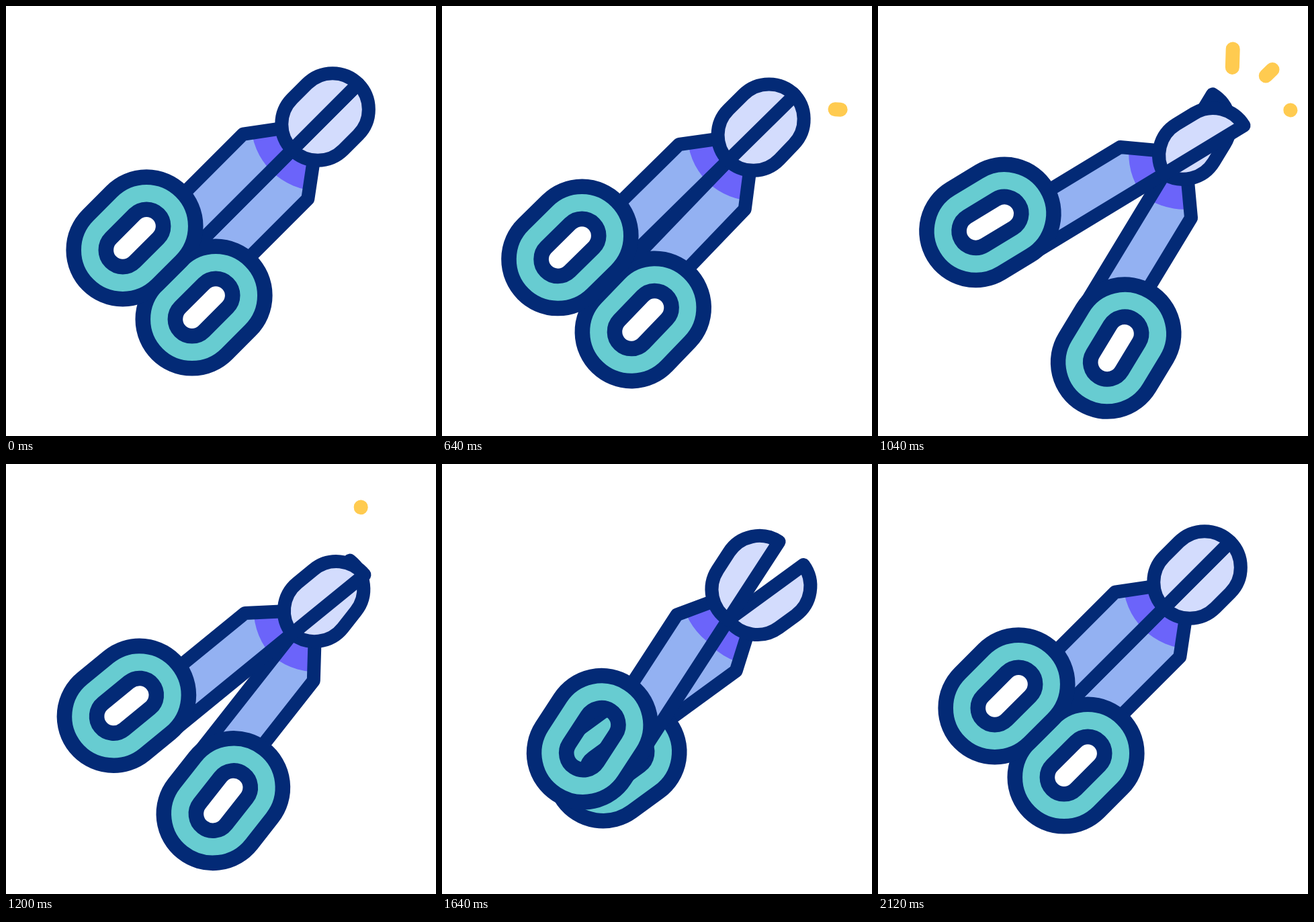
An HTML page with a canvas for the animation above (2440 ms loop, 640 by 640 pixels).

```html
<!DOCTYPE html>
<html lang="en">
<head>
<meta charset="utf-8">
<title>Nippers</title>
<style>
html, body { margin: 0; width: 100%; height: 100%; overflow: hidden; background: #fff; }
canvas { display: block; width: 640px; height: 640px; }
</style>
</head>
<body>
<canvas id="stage"></canvas>
<script>
const LOOP = 2440, STEP = 40;
const NAVY = '#032a76', TEAL = '#67ccd1', BLUE = '#93b1f2';
const PURPLE = '#6b64fa', PALE = '#d3dcfd', YELLOW = '#ffcb50';
const PIVOT = { x: 426, y: 214 };

// [time, value] keys, eased in and out between neighbours
const UPPER = [[200, 0], [470, -3.7], [1010, 14], [1534, -13.5], [2040, 0]];
const LOWER = [[200, 0], [470, 2.8], [1010, -14], [1534, 10], [2040, 0]];
const DROP = [[200, 0], [1200, 38.6], [2040, 0]];

// line from inner to outer end, then grow start/end and shrink start/end
const SPARKS = [
  { line: [585, 153.8, 614, 155], times: [570, 770, 830, 1050] },
  { line: [566, 114.8, 587, 94.5], times: [680, 880, 930, 1140] },
  { line: [527.3, 93, 528.2, 64], times: [780, 980, 1010, 1220] }
];

const canvas = document.getElementById('stage');
const ctx = canvas.getContext('2d');
const scale = window.devicePixelRatio || 1;
canvas.width = canvas.height = Math.round(640 * scale);

function ease(p) {
  p = Math.min(1, Math.max(0, p));
  return p * p * (3 - 2 * p);
}

function valueAt(keys, t) {
  let value = keys[0][1];
  for (let i = 1; i < keys.length; i++) {
    const [t0, v0] = keys[i - 1], [t1, v1] = keys[i];
    if (t >= t0) value = v0 + (v1 - v0) * ease((t - t0) / (t1 - t0));
  }
  return value;
}

function capsule(path, x, y, half, r) {
  path.moveTo(x - half, y - r);
  path.lineTo(x + half, y - r);
  path.arc(x + half, y, r, -Math.PI / 2, Math.PI / 2);
  path.lineTo(x - half, y + r);
  path.arc(x - half, y, r, Math.PI / 2, Math.PI * 1.5);
  path.closePath();
}

// Shapes of one half: x runs along the tool toward the tip, the pivot is the origin
const body = new Path2D();
body.moveTo(0, 0);
body.lineTo(-233.8, 0);
body.lineTo(-180, -40);
body.lineTo(-180, -68.2);
body.lineTo(-35.3, -68.2);
body.lineTo(20, -27.3);
body.closePath();

const collar = new Path2D();
collar.arc(57, 0, 101.5, 0, Math.PI * 2);

const jaw = new Path2D();
jaw.moveTo(0, 0);
jaw.arc(53.8, 0, 53.8, Math.PI, Math.PI * 1.5);
jaw.arc(84.9, 0, 53.8, -Math.PI / 2, 0);
jaw.closePath();

const grip = new Path2D();
capsule(grip, -258.8, -72.9, 25, 73.1);
capsule(grip, -258.8, -72.9, 25, 25);

function outline(path, width) {
  ctx.lineWidth = width;
  ctx.stroke(path);
}

function drawHalf(angle, drop, side) {
  ctx.save();
  ctx.translate(PIVOT.x, PIVOT.y + drop);
  ctx.rotate((angle - 45) * Math.PI / 180);
  ctx.scale(1, side);
  ctx.strokeStyle = NAVY;

  ctx.fillStyle = BLUE;
  ctx.fill(body);
  ctx.save();
  ctx.clip(body);
  ctx.fillStyle = PURPLE;
  ctx.fill(collar);
  ctx.restore();
  outline(body, 20);

  ctx.fillStyle = PALE;
  ctx.fill(jaw);
  outline(jaw, 20);

  ctx.fillStyle = TEAL;
  ctx.fill(grip, 'evenodd');
  outline(grip, 22.6);
  ctx.restore();
}

function drawSpark({ line: [x0, y0, x1, y1], times: [t0, t1, t2, t3] }, t) {
  if (t <= t0 || t >= t3) return;
  const head = ease((t - t0) / (t1 - t0));
  const tail = ease((t - t2) / (t3 - t2));
  ctx.beginPath();
  ctx.moveTo(x0 + (x1 - x0) * tail, y0 + (y1 - y0) * tail);
  ctx.lineTo(x0 + (x1 - x0) * head, y0 + (y1 - y0) * head);
  ctx.strokeStyle = YELLOW;
  ctx.lineWidth = 21;
  ctx.stroke();
}

function draw(t) {
  ctx.setTransform(scale, 0, 0, scale, 0, 0);
  ctx.fillStyle = '#fff';
  ctx.fillRect(0, 0, 640, 640);
  ctx.lineCap = ctx.lineJoin = 'round';
  const drop = valueAt(DROP, t);
  drawHalf(valueAt(LOWER, t), drop, -1);
  drawHalf(valueAt(UPPER, t), drop, 1);
  SPARKS.forEach(spark => drawSpark(spark, t));
}

const start = performance.now();
function tick() {
  const t = (performance.now() - start) % LOOP;
  draw(Math.floor(t / STEP) * STEP);
  requestAnimationFrame(tick);
}
tick();
</script>
</body>
</html>
```
